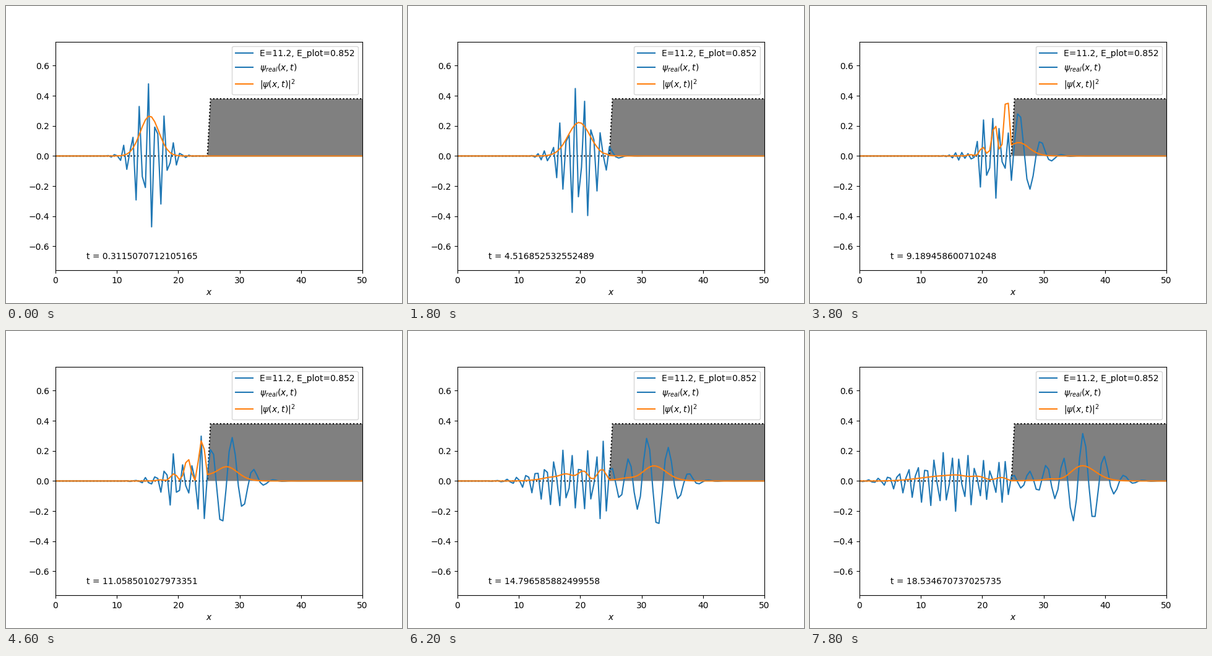
These frames come from a looping animation (640 by 480 pixels, 8000 ms). A matplotlib script:

```python
import numpy as np
import matplotlib.pyplot as plt
from matplotlib.animation import FuncAnimation

# Wave packet meeting a potential step (hbar = m = 1)
N, L = 100, 50.0
V0, X0, SIGMA, K0 = 5.0, 15.0, 1.5, 1.5 * np.pi
FRAMES, INTERVAL = 40, 200
FIRST_STEP, STEPS_PER_FRAME = 2, 3
DT = 0.3115070712105165 / 2  # 2 / (2 / dx**2 + V0)

x = np.linspace(0, L, N)
dx = x[1] - x[0]
V = np.where(x > L / 2, V0, 0.0)


def initial_packet():
    psi = np.exp(-((x - X0) / (2 * SIGMA)) ** 2 + 1j * K0 * x)
    return psi / np.sqrt(dx * np.sum(np.abs(psi) ** 2))


def crank_nicolson():
    hop = np.full(N - 1, -0.5 / dx**2)
    H = np.diag(1 / dx**2 + V) + np.diag(hop, 1) + np.diag(hop, -1)
    half = 0.5j * DT * H
    return np.linalg.solve(np.eye(N) + half, np.eye(N) - half)


def simulate():
    psi, t = initial_packet(), 0.0
    U = crank_nicolson()
    states = []
    for step in range(1, FIRST_STEP + STEPS_PER_FRAME * (FRAMES - 1) + 1):
        psi = U @ psi
        t += DT
        if step % STEPS_PER_FRAME == FIRST_STEP:
            states.append((t, psi))
    return states


states = simulate()
ymax = 1.5 * initial_packet().real.max()
scale = ymax / 2 / V0
E = 0.5 * (K0**2 + 0.5 / SIGMA**2)

fig, ax = plt.subplots(figsize=(6.4, 4.8), dpi=100)
ax.set_xlim(0, L)
ax.set_ylim(-ymax, ymax)
ax.set_xlabel("$x$")

ax.fill_between(x, V * scale, facecolor="gray", linewidth=0)
ax.plot(x, V * scale, ":k")
ax.axhline(E * scale, color="C0", label=f"E={E:.1f}, E_plot={E * scale:.3f}")
real_line, = ax.plot([], [], "C0", label=r"$\psi_{real}(x,t)$")
prob_line, = ax.plot([], [], "C1", label=r"$|\psi(x,t)|^2$")
clock = ax.text(5, -0.9 * ymax, "")
ax.legend(loc="upper right")


def draw(i):
    t, psi = states[i]
    real_line.set_data(x, psi.real)
    prob_line.set_data(x, np.abs(psi) ** 2)
    clock.set_text(f"t = {t}")
    return real_line, prob_line, clock


anim = FuncAnimation(fig, draw, frames=FRAMES, interval=INTERVAL, repeat=True)
plt.show()
```
